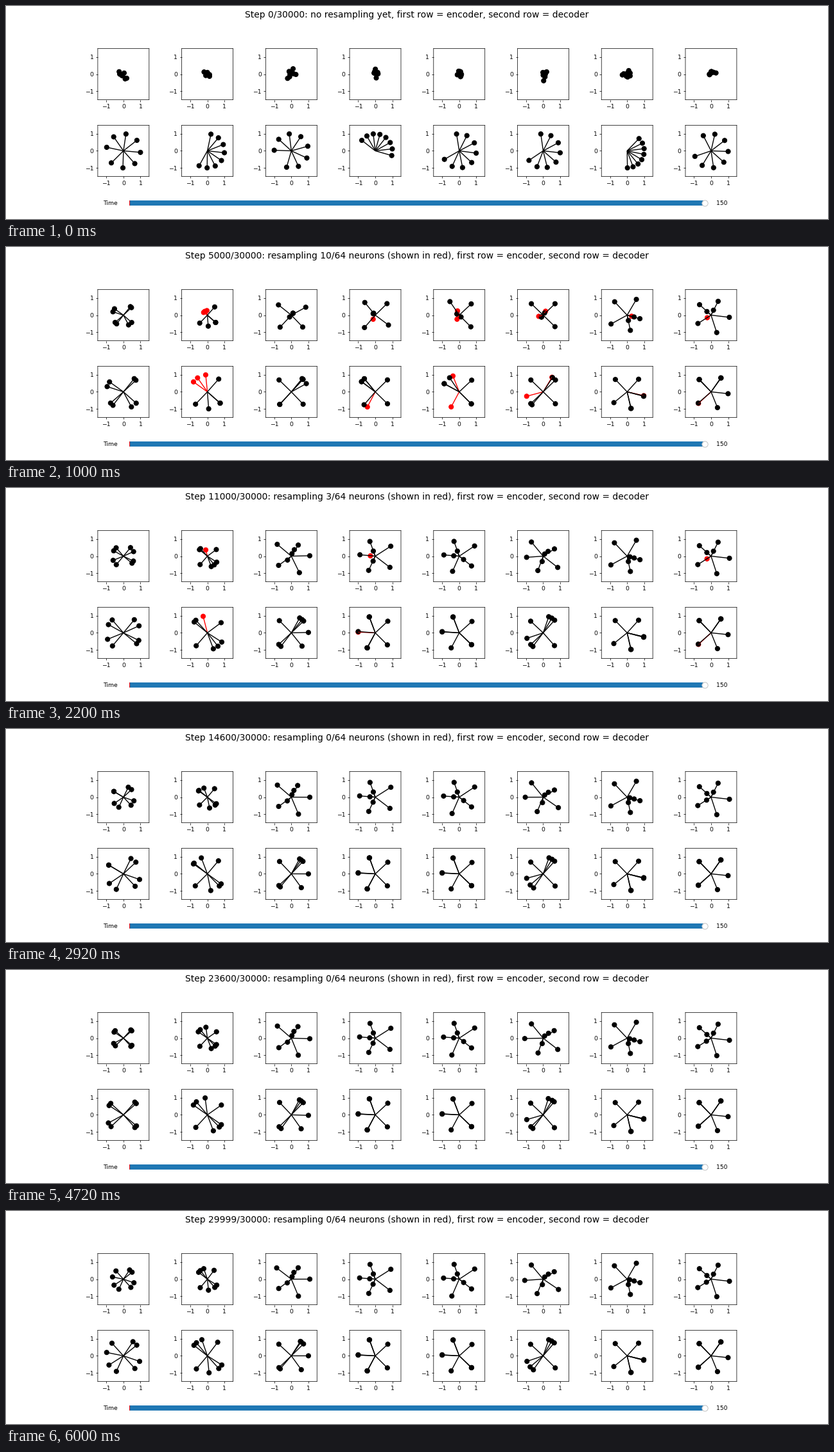
These frames come from a looping animation (1280 by 333 pixels, 6040 ms). A matplotlib script:

```python
import math

import matplotlib.pyplot as plt
import numpy as np
from matplotlib.animation import FuncAnimation
from matplotlib.collections import LineCollection
from matplotlib.widgets import Slider

WIDTH, HEIGHT, DPI = 1280, 333, 200 / 3
FRAMES, INTERVAL = 151, 40
STEPS, STEPS_PER_FRAME = 30000, 200
RESAMPLES = [math.ceil(k * 2500 / STEPS_PER_FRAME) for k in range(1, 12)]
SETTLE = 25

# Per column: arc of the starting directions, {final direction: neurons sharing it},
# spread inside a group, wander (degrees), pull towards the diagonals early on.
COLUMNS = [
    ((-135, 168), {-136: 2, -41: 2, 42: 2, 147: 2}, 20, 12, 0),
    ((-119, 78), {-136: 1, -78: 1, -42: 2, 44: 1, 102: 1, 135: 2}, 2, 9, 0),
    ((-106, 178), {-132: 2, -53: 1, 0: 1, 53: 3, 135: 1}, 7, 2, 0.6),
    ((-16, 142), {-118: 2, -45: 1, 43: 1, 110: 2, 177: 2}, 1, 0, 0.8),
    ((-150, 99), {-118: 1, -44: 2, 42: 1, 111: 2, 177: 2}, 1, 0, 0.6),
    ((-146, 98), {-163: 1, -132: 2, -47: 1, 60: 3, 136: 1}, 12, 2, 0.6),
    ((-89, 46), {-141: 1, -77: 2, -14: 3, 48: 1, 134: 1}, 1, 0, 0),
    ((-161, 117), {-138: 2, -68: 1, -6: 1, 55: 2, 134: 2}, 1, 0, 0),
]
# Dead neurons as {column: indices}, replaced at the first four resamplings.
EARLY = {1: (5, 6, 7), 3: (1,), 4: (0, 5), 5: (0, 5), 6: (5,), 7: (1,)}
LATE = {1: (5,), 3: (7,), 7: (1,)}
DEAD = dict(zip(RESAMPLES, (EARLY, EARLY, LATE, LATE)))

rng = np.random.default_rng(4)


def turn(a, b):
    """Shortest signed rotation from a to b in degrees."""
    return (b - a + 180) % 360 - 180


def unit(angle):
    return np.array([math.cos(math.radians(angle)), math.sin(math.radians(angle))])


def settle(frames, rate):
    return 1 - math.exp(-max(frames, 0) / rate)


def diagonal(angle):
    return 45 + 90 * math.floor(angle / 90)


def build_column(col):
    arc, groups, spread, wander, pull = COLUMNS[col]
    directions = list(groups)
    neurons = []
    for g, (direction, size) in enumerate(groups.items()):
        gap_before = (direction - directions[g - 1]) % 360
        gap_after = (directions[(g + 1) % len(groups)] - direction) % 360
        for k in range(size):
            final = direction + (k - (size - 1) / 2) * spread
            share = 1.08 * 0.85 ** (size - 1) * ((size - k) / size) ** 1.5
            i = len(neurons)
            neurons.append(dict(
                start=arc[0] + (arc[1] - arc[0]) * i / 7,
                final=final,
                early=final + pull * turn(final, diagonal(final)),
                length=0.65 if wander > 5 else share,
                lean=(gap_after - gap_before) / 2 if wander < 5 else 0,
                origin=rng.normal(0, 0.13, 2),
                wander=wander, period=rng.uniform(35, 80), phase=rng.uniform(0, 2 * math.pi),
                resets=[r for r, dead in DEAD.items() if i in dead.get(col, ())]))
    # Before the groups part, one neuron per diagonal does nearly all the work.
    for n in neurons:
        rivals = [m for m in neurons if diagonal(m["final"]) == diagonal(n["final"])]
        leader = max(rivals, key=lambda m: m["length"])
        n["early_length"] = n["length"] if not pull else 0.97 if n is leader else 0.15
    return neurons


def state(n, frame):
    """Encoder point, decoder point and colour of one neuron."""
    past = [r for r in n["resets"] if r <= frame]
    drift = n["wander"] * math.sin(2 * math.pi * frame / n["period"] + n["phase"])
    part = settle(frame - SETTLE, 8)
    if past:
        grow = 1
        angle = n["final"] + drift
        length = 0.27 + (n["length"] - 0.27) * settle(frame - past[-1], 15)
    else:
        waiting = n["resets"] and n["resets"][0] == RESAMPLES[0]
        grow = 0 if waiting else settle(frame, 5)
        angle = (n["start"] + turn(n["start"], n["early"]) * grow
                 + turn(n["early"], n["final"]) * part + drift * grow)
        length = n["early_length"] + (n["length"] - n["early_length"]) * part
    # Encoders lean towards the wider gap between neighbouring groups.
    lean = n["lean"] * (part if n["early"] != n["final"] else 1)
    enc = n["origin"] * (1 - grow) + grow * length * unit(angle + lean)
    latest = max((r for r in RESAMPLES if r <= frame), default=None)
    return enc, unit(angle), "red" if latest in n["resets"] else "black"


columns = [build_column(col) for col in range(len(COLUMNS))]

fig, axes = plt.subplots(2, 8, figsize=((WIDTH + 0.01) / DPI, (HEIGHT + 0.01) / DPI), dpi=DPI)
fig.subplots_adjust(left=0.1003, right=0.9003, bottom=0.2, top=0.8, hspace=0.5, wspace=0.2)
title = fig.suptitle("", fontsize=15)

panels = {}
for (row, col), ax in np.ndenumerate(axes):
    ax.set(xlim=(-1.5, 1.5), ylim=(-1.5, 1.5), aspect="equal",
           xticks=(-1, 0, 1), yticks=(-1, 0, 1))
    for spine in ax.spines.values():
        spine.set_snap(False)
    dots = ax.scatter(np.zeros(8), np.zeros(8), s=60)
    spokes = ax.add_collection(LineCollection([], linewidths=1.5), autolim=False)
    panels[row, col] = dots, spokes

slider = Slider(fig.add_axes([0.15, 0.05, 0.7, 0.05]), "Time", 0, 150,
                valinit=0, valstep=1, valfmt="%d")
slider.set_val(150)


def draw(frame):
    red = 0
    for col, neurons in enumerate(columns):
        states = sorted((state(n, frame) for n in neurons), key=lambda s: s[2] == "black")
        enc, dec, colors = zip(*states)
        red += colors.count("red")
        for row, points in enumerate((enc, dec)):
            dots, spokes = panels[row, col]
            dots.set_offsets(points)
            dots.set_color(colors)
            spokes.set_segments([[(0, 0), p] for p in points])
            spokes.set_color(colors)
    step = min(frame * STEPS_PER_FRAME, STEPS - 1)
    note = ("no resampling yet" if frame < RESAMPLES[0]
            else f"resampling {red}/64 neurons (shown in red)")
    title.set_text(f"Step {step}/{STEPS}: {note}, first row = encoder, second row = decoder")


anim = FuncAnimation(fig, draw, frames=FRAMES, interval=INTERVAL,
                     init_func=lambda: None, repeat=True, repeat_delay=0)
plt.show()
```
